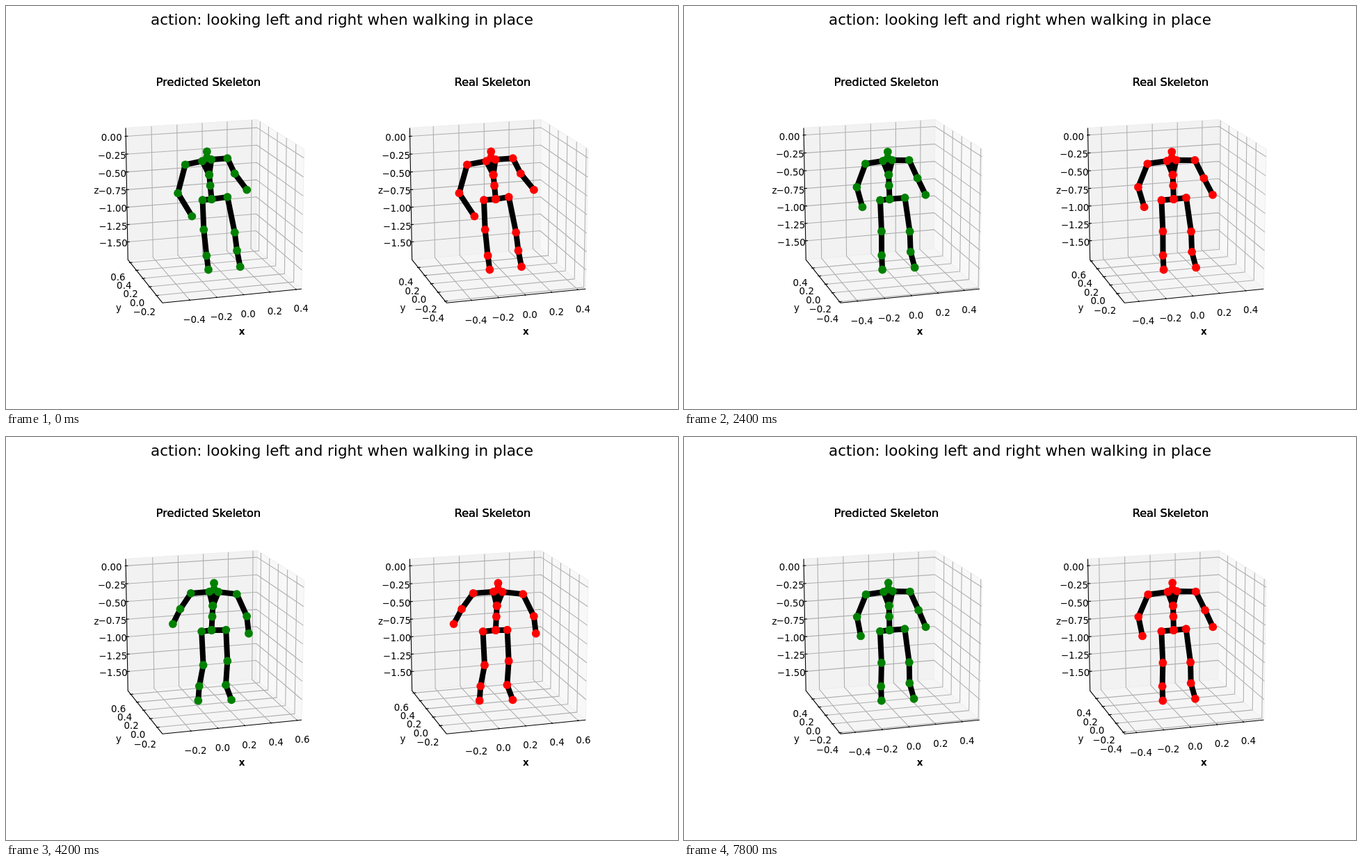
An HTML page with a canvas that plays this animation: 966 px wide and 580 px high, repeating every 8000 ms.

```html
<!DOCTYPE html>
<html lang="en">
<head>
<meta charset="utf-8">
<title>Skeleton comparison</title>
<style>
  html, body { margin: 0; width: 100%; height: 100%; overflow: hidden; background: #fff; }
  canvas { display: block; }
</style>
</head>
<body>
<canvas id="stage" width="966" height="580"></canvas>
<script>
const ctx = document.getElementById('stage').getContext('2d');
const LOOP = 8000, STEP = 600;

const wave = (step, peak, period) => Math.cos(2 * Math.PI * (step - peak) / period);
const bodyWave = step => wave(step, 8.7, 16);

// reach widens the arms, hip shifts the legs; zeroX and zeroY place the axis zeros.
const panels = [
  {
    title: 'Predicted Skeleton', color: '#008000', dx: 0, reach: .96, hip: 0,
    zeroX: step => -.025 - .105 * bodyWave(step),
    zeroY: step => -.125 - .045 * wave(step, 7.5, 9),
  },
  {
    title: 'Real Skeleton', color: '#ff0000', dx: 408.4, reach: 1.04, hip: -4,
    zeroX: step => -.045 - .108 * bodyWave(step),
    zeroY: step => -.105 - .027 * wave(step, 7, 13),
  },
];
const zeroZ = step => .45 - .012 * Math.exp(-step / 3);

// Joints as offsets from the pelvis: x, y turned left, then x, y turned right.
const body = {
  head: [-2.5, -68.2, 4.8, -67.7],
  armL: [[-36, -51, -30, -53.5], [-49, -17.5, -46.5, -33], [-41, 11, -61.5, -13]],
  armR: [[29.5, -56, 39.5, -51], [42, -30, 55, -18], [54, -6, 56, 7]],
  legL: [[-13.5, 1.5, -14.5, 2], [-11.5, 46.5, -12, 51], [-11.5, 81, -19, 80.5], [-10.5, 101.5, -21, 101.5]],
  legR: [[22, -2, 20.5, 0], [29, 46.5, 21.5, 44], [30, 76, 18.5, 79.5], [36, 98.5, 27, 100.7]],
};

// Perspective view of a unit box centred on the origin.
const rad = Math.PI / 180;
const [sa, ca, se, ce] = [Math.sin(16.8 * rad), Math.cos(16.8 * rad), Math.sin(15.6 * rad), Math.cos(15.6 * rad)];
function project(x, y, z) {
  const depth = sa * x + ca * y;
  const s = 2028 / (10 + depth * ce - z * se);
  return [296.1 + (ca * x - sa * y) * s, 289.2 - (depth * se + z * ce) * s];
}

function trace(points) {
  ctx.beginPath();
  points.forEach(p => ctx.lineTo(...p));
}
function line(points, color, width) {
  trace(points);
  ctx.strokeStyle = color;
  ctx.lineWidth = width;
  ctx.stroke();
}
const line3 = (points, color) => line(points.map(p => project(...p)), color, 1.1);

function text(str, x, y, size = 13.4, weight = '') {
  ctx.font = `${weight} ${size}px "DejaVu Sans", sans-serif`;
  ctx.fillStyle = '#000';
  ctx.fillText(str, x, y + size * .365);
}
const tickText = (v, digits) => v.toFixed(digits).replace('-', '\u2212');

function ticks(zero, step, scale) {
  const list = [];
  for (let i = -8; i <= 8; i++) {
    const at = zero + i * step * scale;
    if (Math.abs(at) <= .48) list.push([at, i * step]);
  }
  return list;
}

const h = .5, gap = .604;
function drawAxes(zx, zy, zz) {
  const panes = [
    ['#f2f2f2', [-h, h, -h], [h, h, -h], [h, h, h], [-h, h, h]],
    ['#f8f8f8', [h, -h, -h], [h, h, -h], [h, h, h], [h, -h, h]],
    ['#f5f5f5', [-h, -h, -h], [h, -h, -h], [h, h, -h], [-h, h, -h]],
  ];
  for (const [color, ...corners] of panes) {
    trace(corners.map(p => project(...p)));
    ctx.closePath();
    ctx.fillStyle = color;
    ctx.fill();
    ctx.strokeStyle = '#eee';
    ctx.lineWidth = 1;
    ctx.stroke();
  }

  const xs = ticks(zx, .2, .96);
  const ys = ticks(zy, .2, .96);
  const zs = ticks(zz, .25, .96 / 1.8);
  const grid = '#b0b0b0';
  for (const [x] of xs) line3([[x, -h, -h], [x, h, -h], [x, h, h]], grid);
  for (const [y] of ys) line3([[-h, y, -h], [h, y, -h], [h, y, h]], grid);
  for (const [z] of zs) line3([[-h, h, z], [h, h, z], [h, -h, z]], grid);

  line3([[-h, h, h], [-h, h, -h], [-h, -h, -h], [h, -h, -h]], '#000');
  const out = -h - .0083, into = -h + .0167;
  for (const [x, v] of xs) {
    line3([[x, out, -h], [x, into, -h]], '#000');
    text(tickText(v, 1), ...project(x, -gap, -gap));
  }
  for (const [y, v] of ys) {
    line3([[out, y, -h], [into, y, -h]], '#000');
    const [px, py] = project(-gap, y * 1.04, -gap);
    text(tickText(v, 1), px + 2.5, py + .4);
  }
  for (const [z, v] of zs) {
    line3([[out, h, z], [into, h, z]], '#000');
    const [px, py] = project(-h, h, z);
    text(tickText(v, 2), px - 20.5, py + 2);
  }
  text('x', 339, 468.5, 13.4, 'bold');
  text('y', 162, 434.5);
  text('z', 130, 265.5);
}

function drawSkeleton({ dx, color, reach, hip }, step) {
  const turn = .2 + .8 * bodyWave(step);
  const pelvis = [295.5 + dx, 278];
  const place = (scale = 1, shift = 0) => ([x0, y0, x1, y1]) => [
    pelvis[0] + (x0 + (x1 - x0) * turn) * scale + shift,
    pelvis[1] + y0 + (y1 - y0) * turn,
  ];
  const head = place()(body.head);
  const armL = body.armL.map(place(reach)), armR = body.armR.map(place(reach));
  const legL = body.legL.map(place(1, hip)), legR = body.legR.map(place(1, hip));

  const tilt = (armL[0][1] - armR[0][1]) * .12;
  const collarL = [head[0] - 6.8, head[1] + 12.6 + tilt];
  const collarR = [head[0] + 6.3, head[1] + 12.6 - tilt];
  const neck = [head[0], head[1] + 9];
  const chest = [(head[0] + pelvis[0]) / 2, 243];
  const spine = [chest[0] + (pelvis[0] - chest[0]) * .44, 258.5];
  const bones = [
    [head, neck, chest, spine, pelvis],
    [chest, collarL, ...armL],
    [chest, collarR, ...armR],
    [pelvis, ...legL],
    [pelvis, ...legR],
  ];
  bones.forEach(bone => line(bone, '#000', 8));
  ctx.fillStyle = color;
  for (const [x, y] of bones.flat()) {
    ctx.beginPath();
    ctx.arc(x, y, 5.9, 0, 7);
    ctx.fill();
  }
}

function draw(step) {
  ctx.fillStyle = '#fff';
  ctx.fillRect(0, 0, 966, 580);
  ctx.textAlign = 'center';
  ctx.lineJoin = 'bevel';
  text('action: looking left and right when walking in place', 483, 19.5, 21.5);
  for (const panel of panels) {
    ctx.save();
    ctx.translate(panel.dx, 0);
    drawAxes(panel.zeroX(step), panel.zeroY(step), zeroZ(step));
    for (let i = 0; i < 3; i++) text(panel.title, 291, 109, 16.1);
    ctx.restore();
    drawSkeleton(panel, step);
  }
}

function frame() {
  draw(Math.floor(performance.now() % LOOP / STEP));
  requestAnimationFrame(frame);
}
frame();
</script>
</body>
</html>
```
